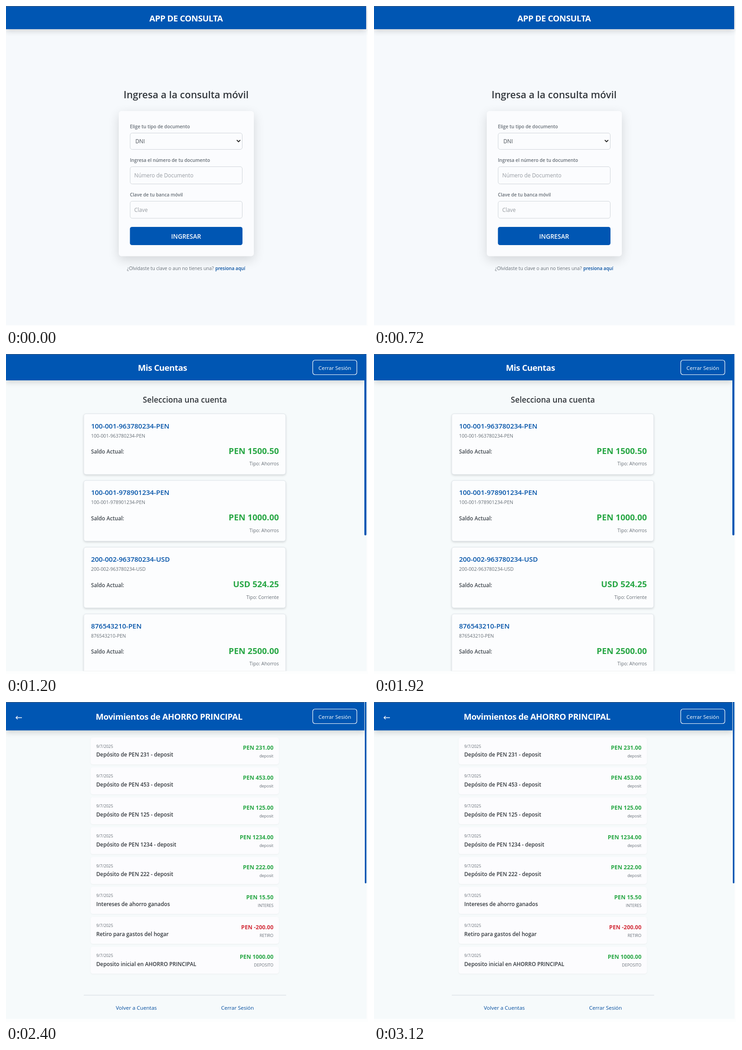
Write an HTML page with a canvas that moves like this. It is 796 by 704 pixels and loops after 3600 ms.

```html
<!DOCTYPE html>
<html lang="es">
<head>
<meta charset="utf-8">
<title>App de consulta</title>
<style>
  html, body { margin: 0; width: 100%; height: 100%; overflow: hidden; background: #fdfefe; }
  canvas { display: block; }
</style>
</head>
<body>
<canvas id="stage" width="796" height="704"></canvas>
<script>
const ctx = document.getElementById('stage').getContext('2d');
const SCREEN_MS = 1200;
const BLUE = '#0056b3', LINK = '#004c9e', GREEN = '#28a745', RED = '#d32f3c';
const INK = '#32373c', GRAY = '#656d75', HINT = '#959a a0'.replace(' ', ''), PAPER = '#fbfcfe';

function text(str, x, y, size, color, weight = 400, align = 'left', tracking = 0) {
  ctx.font = `${weight} ${size}px "Open Sans", "Noto Sans", sans-serif`;
  ctx.letterSpacing = `${tracking}px`;
  ctx.textAlign = align;
  ctx.fillStyle = color;
  ctx.fillText(str, x, Math.round(y));
}

function rect(x, y, w, h, color) {
  ctx.fillStyle = color;
  ctx.fillRect(x, y, w, h);
}

function box(x, y, w, h, radius, { fill, stroke, shadow, lineWidth = 1 }) {
  ctx.beginPath();
  ctx.roundRect(x, y, w, h, radius);
  if (fill) {
    ctx.save();
    if (shadow) {
      [ctx.shadowOffsetY, ctx.shadowBlur] = shadow;
      ctx.shadowColor = `rgba(0, 0, 0, ${shadow[2]})`;
    }
    ctx.fillStyle = fill;
    ctx.fill();
    ctx.restore();
  }
  if (stroke) {
    ctx.strokeStyle = stroke;
    ctx.lineWidth = lineWidth;
    ctx.stroke();
  }
}

function line(points, color, width) {
  ctx.beginPath();
  points.forEach(([x, y]) => ctx.lineTo(x, y));
  ctx.strokeStyle = color;
  ctx.lineWidth = width;
  ctx.stroke();
}

function page(height, background) {
  rect(0, 0, 796, 704, '#fdfefe');
  rect(0, 0, 793, height, background);
}

function header(title, x, baseline, width, height) {
  box(0, 0, width, height, 0, { fill: BLUE, shadow: [4, 12, 0.16] });
  rect(0, 0, width, 1, '#4f6072');
  text(title, x, baseline, 18.5, '#fff', 700, 'center', -0.4);
}

function logoutButton(y) {
  box(674.5, y, 97, 32, 5, { stroke: '#fff', lineWidth: 1.2 });
  text('Cerrar Sesión', 723, y + 21, 11.5, '#fff', 400, 'center');
}

function scrollbar(x, width) {
  box(x, 0, width, 399, [0, 0, 2, 2], { fill: BLUE });
}

function field(label, labelY, y, h, value, valueX, color) {
  text(label, 272.5, labelY, 10.2, GRAY, 600);
  box(273, y, 246.5, h, 4.5, { fill: PAPER, stroke: '#d0d5da' });
  text(value, valueX, y + h / 2 + 4.5, 11.8, color);
}

function login() {
  page(702, '#f6f9fc');
  header('APP DE CONSULTA', 396, 34, 792, 51);
  text('Ingresa a la consulta móvil', 396, 203, 21.5, INK, 600, 'center');

  box(248, 231, 297, 319.5, 6, { fill: PAPER, shadow: [8, 24, 0.14] });
  field('Elige tu tipo de documento', 269, 279.5, 36, 'DNI', 284.5, '#495057');
  line([[507.5, 295], [511.3, 298.7], [515.1, 295]], '#222', 1.8);
  field('Ingresa el número de tu documento', 343, 353.5, 38, 'Número de Documento', 282, HINT);
  field('Clave de tu banca móvil', 419, 429.5, 37.5, 'Clave', 282, HINT);
  box(272.5, 486, 247.5, 40, 4.5, { fill: BLUE });
  text('INGRESAR', 396, 512, 13.5, '#fff', 600, 'center');

  text('¿Olvidaste tu clave o aun no tienes una?', 266, 581, 10.3, GRAY);
  text('presiona aquí', 526, 581, 10, LINK, 600, 'right');
}

const accounts = [
  ['100-001-963780234-PEN', 'PEN 1500.50', 'Ahorros'],
  ['100-001-978901234-PEN', 'PEN 1000.00', 'Ahorros'],
  ['200-002-963780234-USD', 'USD 524.25', 'Corriente'],
  ['876543210-PEN', 'PEN 2500.00', 'Ahorros'],
];

function accountList() {
  page(697.5, '#f6fafb');
  ctx.save();
  ctx.beginPath();
  ctx.rect(0, 0, 796, 697.5);
  ctx.clip();
  accounts.forEach(([number, balance, type], i) => {
    const y = 131.5 + i * 146.8;
    box(171, y, 444, 133.5, 5, { fill: '#fcfdfe', stroke: '#dfe5ea', shadow: [2, 5, 0.16] });
    text(number, 187, y + 32, 15, '#0052a8', 600);
    text(number, 187, y + 52, 10.4, GRAY);
    text('Saldo Actual:', 187, y + 87.5, 11.7, '#3f464d', 600);
    text(balance, 600, y + 88, 18.5, GREEN, 700, 'right');
    text('Tipo: ' + type, 600, y + 113.5, 10.3, GRAY, 400, 'right');
  });
  ctx.restore();
  header('Mis Cuentas', 344, 37, 788, 58);
  logoutButton(13.5);
  text('Selecciona una cuenta', 393.3, 107, 17.2, INK, 600, 'center');
  scrollbar(788, 4.5);
}

const deposit = n => [`Depósito de PEN ${n} - deposit`, `PEN ${n}.00`, 'deposit'];
const movements = [
  ...[231, 453, 125, 1234, 222].map(deposit),
  ['Intereses de ahorro ganados', 'PEN 15.50', 'INTERES'],
  ['Retiro para gastos del hogar', 'PEN -200.00', 'RETIRO'],
  ['Deposito inicial en AHORRO PRINCIPAL', 'PEN 1000.00', 'DEPOSITO'],
];

function movementList() {
  page(697, '#f6fafb');
  movements.forEach(([detail, amount, type], i) => {
    const y = 78 + i * 65.75;
    box(186, y, 414, 59.5, 5, { fill: '#fcfcfe', shadow: [1, 3, 0.05] });
    text('9/7/2025', 198.5, y + 22.7, 8.9, GRAY);
    text(detail, 198.5, y + 42.3, 11.75, INK, 600);
    text(amount, 588, y + 27, 12.4, amount.includes('-') ? RED : GREEN, 700, 'right');
    text(type, 588, y + 44, 8.9, GRAY, 400, 'right');
  });
  header('Movimientos de AHORRO PRINCIPAL', 358.5, 39, 788, 62.5);
  line([[35, 34.5], [22, 34.5]], '#fff', 1.5);
  line([[25.5, 31], [22, 34.5], [25.5, 38]], '#fff', 1.5);
  logoutButton(15.5);
  scrollbar(789, 3.5);

  rect(171, 644.5, 445, 1, '#d3dade');
  text('Volver a Cuentas', 286.5, 677, 11.6, LINK, 400, 'center');
  text('Cerrar Sesión', 509, 677, 11.5, LINK, 400, 'center');
}

const screens = [login, accountList, movementList];

function draw() {
  screens[Math.floor(performance.now() / SCREEN_MS) % screens.length]();
  requestAnimationFrame(draw);
}
draw();
</script>
</body>
</html>
```
